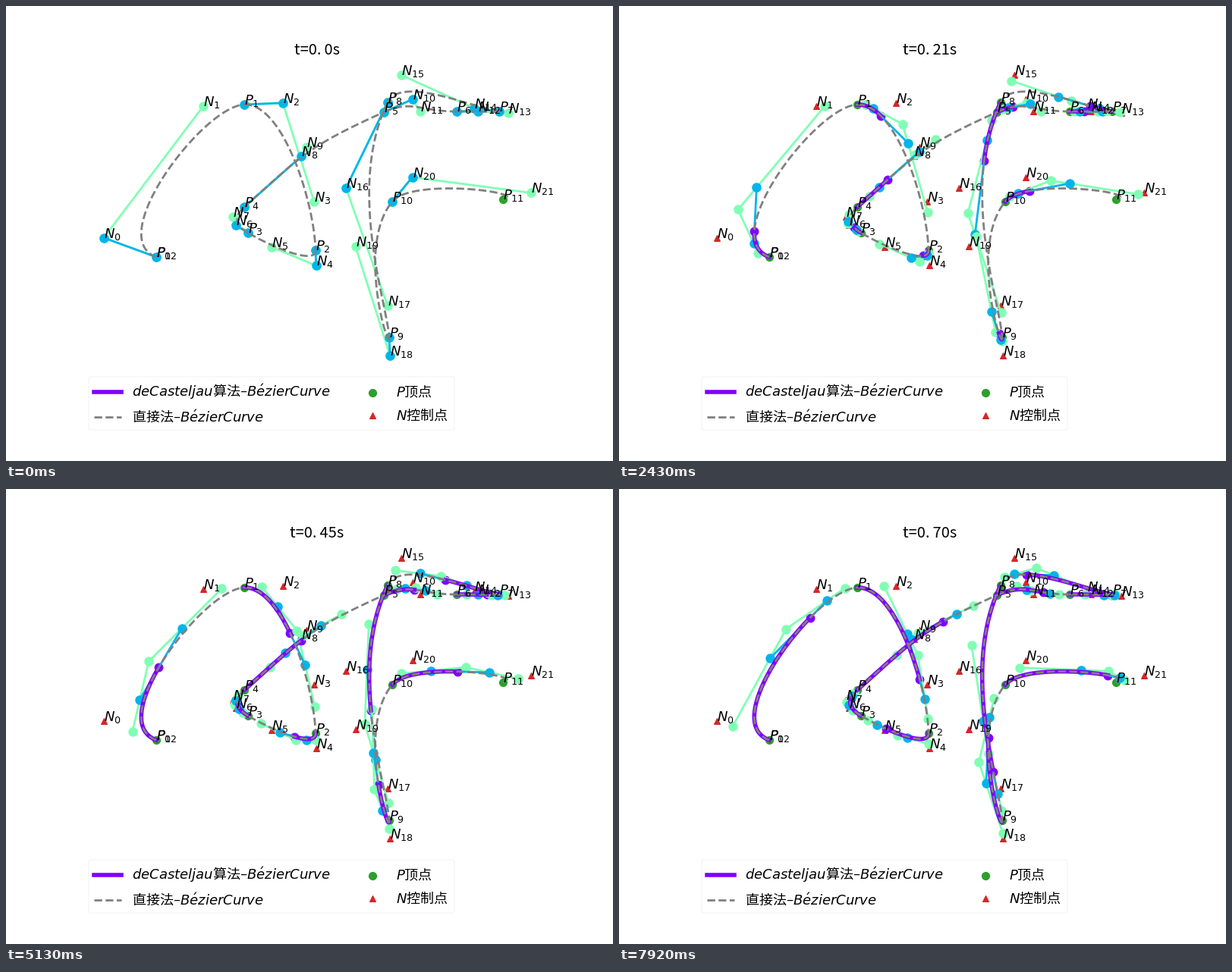
Recreate the animation shown at these times as a matplotlib script. Size 800x600 px, loop 8 s.

```python
import numpy as np
import matplotlib.pyplot as plt
from matplotlib.animation import FuncAnimation
from matplotlib.patches import FancyBboxPatch

W, H, DPI = 800, 600, 100
FRAMES, LOOP = 89, 8000
STEPS = 126  # frames needed for t to run from 0 to 1
ASPECT = (0.67, 1)  # x and y weights when measuring edge lengths

CJK = "Noto Sans CJK JP"
PURPLE, BLUE, MINT = "#8000ff", "#00b5eb", "#80ffb4"
GREEN, RED, GRAY = "#2ca02c", "#d62728", "#808080"

plt.rcParams["font.family"] = [CJK, "DejaVu Sans"]
plt.rcParams["mathtext.fontset"] = "dejavusans"

# Vertices of the closed outline, in pixels from the top left
P = np.array([
    (198, 331), (314, 130), (408, 322), (319, 299), (314, 265), (498, 140),
    (594, 139), (650, 139), (503, 127), (505, 437), (509, 258), (655, 255),
], float)


def smooth_controls(pts):
    """Two controls per edge, from edge midpoints split by edge length."""
    edge = np.roll(pts, -1, axis=0) - pts
    size = np.linalg.norm(edge * ASPECT, axis=1)
    mid = pts + edge / 2
    before, size_before = np.roll(mid, 1, axis=0), np.roll(size, 1)
    tangent = mid - before
    ratio = (size_before / (size_before + size))[:, None]
    entering = pts - tangent * ratio
    leaving = pts + tangent * (1 - ratio)
    return np.stack([leaving[:-1], entering[1:]], axis=1).reshape(-1, 2)


N = smooth_controls(P)
SEGMENTS = [np.array([P[i], N[2 * i], N[2 * i + 1], P[i + 1]])
            for i in range(len(P) - 1)]


def bezier(pts, t):
    t = np.asarray(t)[:, None]
    s = 1 - t
    return (s**3 * pts[0] + 3 * s**2 * t * pts[1]
            + 3 * s * t**2 * pts[2] + t**3 * pts[3])


def casteljau(pts, t):
    """Return the successive levels of interpolated points."""
    levels = []
    while len(pts) > 1:
        pts = (1 - t) * pts[:-1] + t * pts[1:]
        levels.append(pts)
    return levels


fig = plt.figure(figsize=(W / DPI, H / DPI), dpi=DPI, facecolor="white")
ax = fig.add_axes([0, 0, 1, 1])
ax.set_xlim(0, W)
ax.set_ylim(H, 0)
ax.axis("off")


def dots(x, y, color, z):
    ax.scatter(x, y, s=50, color=color, zorder=z)


def triangles(x, y, color, z):
    ax.scatter(x, y, s=30, color=color, marker="^", zorder=z)


dots(*P.T, GREEN, 1)
triangles(*N.T, RED, 1)
for name, pts in (("P", [*P, P[0]]), ("N", N)):
    for i, (x, y) in enumerate(pts):
        ax.text(x, y, f"${name}_{{{i}}}$", fontsize=13, zorder=5)

rows = []
for pts in SEGMENTS:
    tip, = ax.plot([], [], "o", color=PURPLE, ms=7.5, zorder=2)
    outer, = ax.plot([], [], "o-", color=MINT, lw=2, ms=8, zorder=2)
    inner, = ax.plot([], [], "o-", color=BLUE, lw=2, ms=8, zorder=2)
    curve, = ax.plot([], [], color=PURPLE, lw=4, zorder=2.5)
    rows.append((curve, tip, outer, inner))
    ax.plot(*bezier(pts, np.linspace(0, 1, 101)).T, "--",
            color=GRAY, lw=2, zorder=3)

title = ax.text(410, 64, "", fontsize=14.5, ha="center", zorder=5)


def draw_legend():
    ax.add_patch(FancyBboxPatch(
        (111, 491), 478, 66, boxstyle="round,pad=2,rounding_size=3",
        fc="white", ec="#f5f5f5", lw=1, zorder=4))
    ax.plot([116, 152], [509, 509], color=PURPLE, lw=4, zorder=5)
    ax.plot([116, 152], [542, 542], "--", color=GRAY, lw=2, zorder=5)
    dots(483, 510, GREEN, 5)
    triangles(483, 540, RED, 5)
    bez = r"$B\acute{e}zierCurve$"
    for x, y, label in ((166.5, 515.3, "$deCasteljau$算法–" + bez),
                        (166.5, 548.3, "直接法–" + bez),
                        (514.5, 515.3, "$P$顶点"),
                        (514.5, 545.3, "$N$控制点")):
        ax.text(x, y, label, fontsize=13, zorder=5)


draw_legend()


def update(frame):
    t = frame / STEPS
    clock = f"t={t:.2f}s" if frame else "t=0.0s"
    title.set_text(clock.replace(".", ".\u2009"))
    past = np.arange(frame + 1) / STEPS
    for pts, (curve, tip, outer, inner) in zip(SEGMENTS, rows):
        first, second, last = casteljau(pts, t)
        curve.set_data(*bezier(pts, past).T)
        tip.set_data(*last.T)
        outer.set_data(*first.T)
        inner.set_data(*second.T)
    return [title, *(line for row in rows for line in row)]


anim = FuncAnimation(fig, update, frames=FRAMES, interval=LOOP / FRAMES,
                     init_func=lambda: update(0), repeat=True,
                     repeat_delay=0, blit=False)
plt.show()
```
